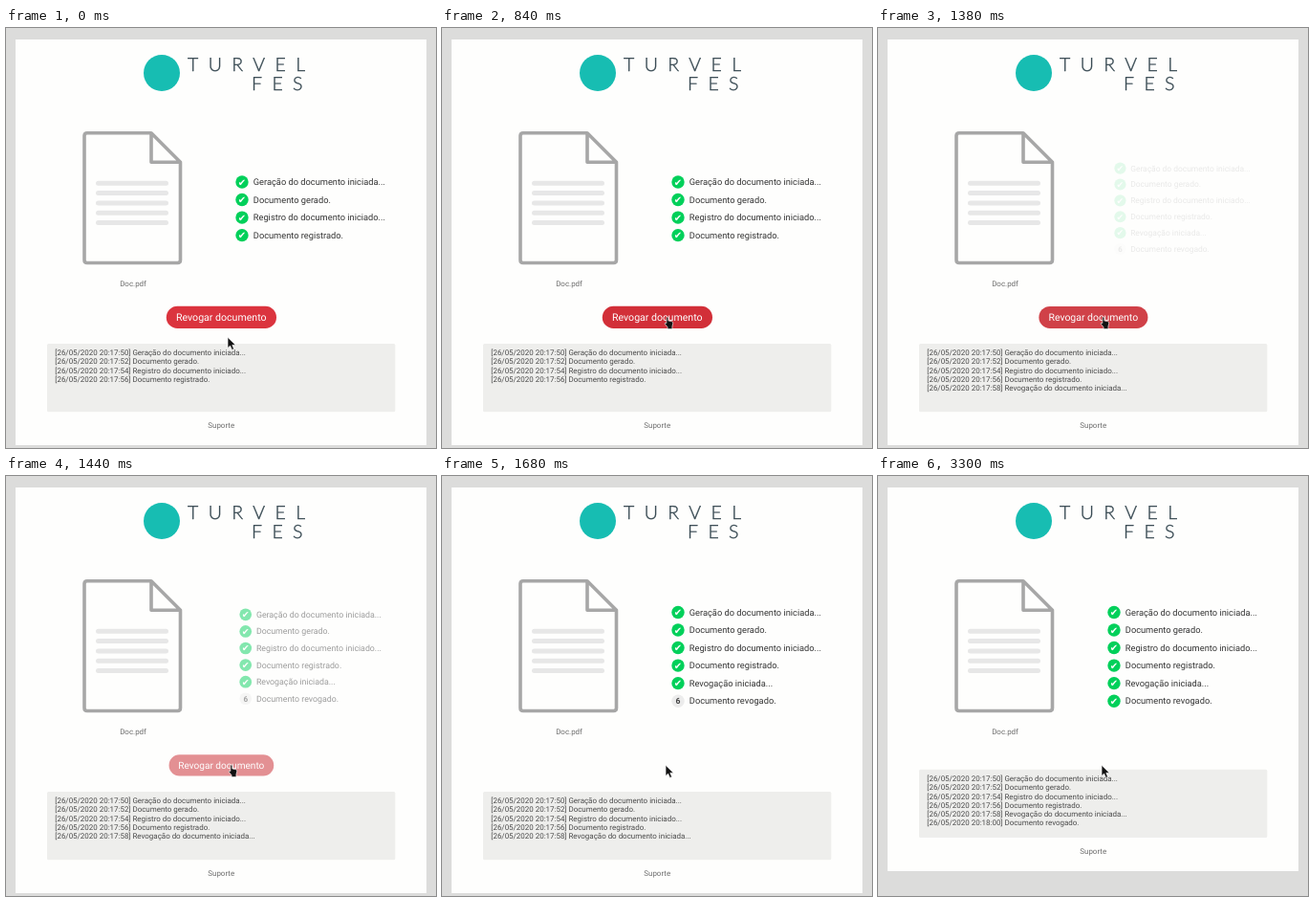
Animation of 450 by 439 pixels, one loop 3720 ms. Source, as an HTML page:

```html
<!DOCTYPE html>
<html lang="pt">
<head>
<meta charset="utf-8">
<style>
  html, body { margin: 0; width: 100%; height: 100%; overflow: hidden; background: #dcdcdb; }
  svg { display: block; width: 450px; height: 439px; font-family: Roboto, sans-serif; text-rendering: geometricPrecision; }
  .brand { font: 300 19.5px Lato, sans-serif; letter-spacing: 10.4px; fill: #34464f; stroke: #34464f; stroke-width: .35; }
  .small { font-size: 7.96px; fill: #6c6c6c; }
  .log { font-size: 7.96px; fill: #4a4a4a; }
  .step { font-size: 9.28px; fill: #333; }
  .tick { font: 10px "DejaVu Sans", sans-serif; fill: #fff; text-anchor: middle; }
  .number { font-size: 8.6px; font-weight: 700; fill: #444; text-anchor: middle; }
  .middle { text-anchor: middle; }
</style>
</head>
<body>
<svg viewBox="0 0 450 439">
  <rect id="panel" x="10" y="12" width="430" height="424" fill="#fefefd"/>
  <circle cx="163" cy="47" r="19" fill="#17bdb2"/>
  <text class="brand" x="190" y="45.3">TURVEL</text>
  <text class="brand" x="257" y="64.8">FES</text>

  <path d="M152 109.8H85q-3 0-3 3V242.5q0 3 3 3H179.5q3 0 3-3V140.3L152 109.8V140.3H182.5"
        fill="none" stroke="#a7a7a7" stroke-width="3.6" stroke-linejoin="round"/>
  <path d="M96.5 162.3h71m-71 10.3h71m-71 10.3h71m-71 10.3h71m-71 10.3h71"
        stroke="#e7e7e7" stroke-width="5" stroke-linecap="round"/>
  <text class="small middle" x="133" y="270.2">Doc.pdf</text>

  <g id="steps"></g>
  <g id="button">
    <rect x="167.8" y="290.8" width="115.2" height="23.2" rx="11.6"/>
    <text class="middle" x="225.3" y="305.9" font-size="10.6" fill="#fff">Revogar documento</text>
  </g>
  <g id="footer">
    <rect x="43" y="330" width="364.3" height="71.3" rx="1.5" fill="#eeeeec"/>
    <g id="log"></g>
    <text class="small middle" x="225.2" y="418">Suporte</text>
  </g>

  <g id="arrow" fill="#111" stroke="#fff" stroke-width=".7">
    <path d="M0 0V11.2L2.6 8.9 4.5 13.1 6.6 12.2 4.8 8.1H8.3Z"/>
  </g>
  <g id="hand" fill="#111" stroke="#fff" stroke-width=".6">
    <path d="M.9 .8Q1.9-.4 2.8 .8V4.2L6.6 5Q7.8 5.4 7.7 6.8L6.9 10.3V12.8H2.1V11L-.9 7.3Q-1 5.9.9 6.8Z"/>
  </g>
</svg>
<script>
const LOOP = 3720, TICK = 60;
const STEP_GAP = 18.55, LOG_GAP = 9.28;
const LIST_CENTER = [318.5, 188.8], BUTTON_CENTER = [225.4, 302.4];
const steps = ['Geração do documento iniciada...', 'Documento gerado.', 'Registro do documento iniciado...',
  'Documento registrado.', 'Revogação iniciada...', 'Documento revogado.'];
const logTexts = steps.map((s, i) => i === 4 ? 'Revogação do documento iniciada...' : s);
const $ = id => document.getElementById(id);

const clamp = x => Math.max(0, Math.min(1, x));
const progress = (t, from, to) => clamp((t - from) / (to - from));
const mix = (a, b, p) => a.map((v, i) => v + (b[i] - v) * p);
const rgb = c => `rgb(${c.map(Math.round)})`;
const place = (id, x, y) => $(id).setAttribute('transform', `translate(${x} ${y})`);
const show = (id, visible) => $(id).setAttribute('visibility', visible ? 'visible' : 'hidden');

// The CSS "ease" curve, solved by bisection.
function ease(x) {
  const bezier = (a, b, u) => 3 * a * u * (1 - u) ** 2 + 3 * b * u * u * (1 - u) + u ** 3;
  let low = 0, high = 1;
  for (let i = 0; i < 20; i++) {
    const u = (low + high) / 2;
    if (bezier(.25, .25, u) < x) low = u; else high = u;
  }
  return x >= 1 ? 1 : bezier(.1, 1, low);
}

function zoom(id, [cx, cy], visible) {
  const scale = .9 + .1 * visible;
  $(id).setAttribute('opacity', visible);
  $(id).setAttribute('transform', `translate(${cx} ${cy}) scale(${scale}) translate(${-cx} ${-cy})`);
}

function stepMarkup(text, i, count, done) {
  const y = LIST_CENTER[1] + (i - (count - 1) / 2) * STEP_GAP;
  const badge = i < done
    ? `<text class="tick" x="247" y="${y + 3.6}">✔</text>`
    : `<text class="number" x="247" y="${y + 3.1}">${i + 1}</text>`;
  return `<circle cx="247" cy="${y}" r="6.7" fill="${i < done ? '#00d05a' : '#ececec'}"/>${badge}
    <text class="step" x="258.8" y="${y + 3.2}">${text}</text>`;
}

function logMarkup(text, i) {
  const time = i < 5 ? `20:17:${50 + 2 * i}` : '20:18:00';
  return `<text class="log" x="51.3" y="${342.2 + i * LOG_GAP}">[26/05/2020 ${time}] ${text}</text>`;
}

let lastState = '';
function updateLists(count, done) {
  const state = `${count},${done}`;
  if (state === lastState) return;
  lastState = state;
  $('steps').innerHTML = steps.slice(0, count).map((s, i) => stepMarkup(s, i, count, done)).join('');
  $('log').innerHTML = logTexts.slice(0, done).map(logMarkup).join('');
}

function draw(time) {
  const t = Math.floor(time % LOOP / TICK) * TICK;
  const revoking = t >= 1380, collapsed = t >= 1740;

  updateLists(revoking ? 6 : 4, t >= 3300 ? 6 : revoking ? 5 : 4);
  const change = ease(progress(t, 1345, 1680));
  zoom('steps', LIST_CENTER, revoking ? change : 1);
  zoom('button', BUTTON_CENTER, 1 - change);

  const hover = mix([219, 52, 62], [210, 47, 56], progress(t, 600, 780));
  const color = mix(hover, [203, 44, 52], progress(t, 1260, 1320));
  $('button').firstElementChild.setAttribute('fill', rgb(color));

  place('footer', 0, collapsed ? -23.2 : 0);
  $('panel').setAttribute('height', collapsed ? 401 : 424);

  const move = progress(t, 480, 840);
  const [x, y] = mix([232, 323.3], [234, 302.3], move);
  const pointing = t >= 660 && t < 1680;
  place('arrow', x, y);
  place('hand', x, y - .5);
  show('arrow', !pointing);
  show('hand', pointing);
}

function frame() {
  draw(performance.now());
  requestAnimationFrame(frame);
}
frame();
</script>
</body>
</html>
```
